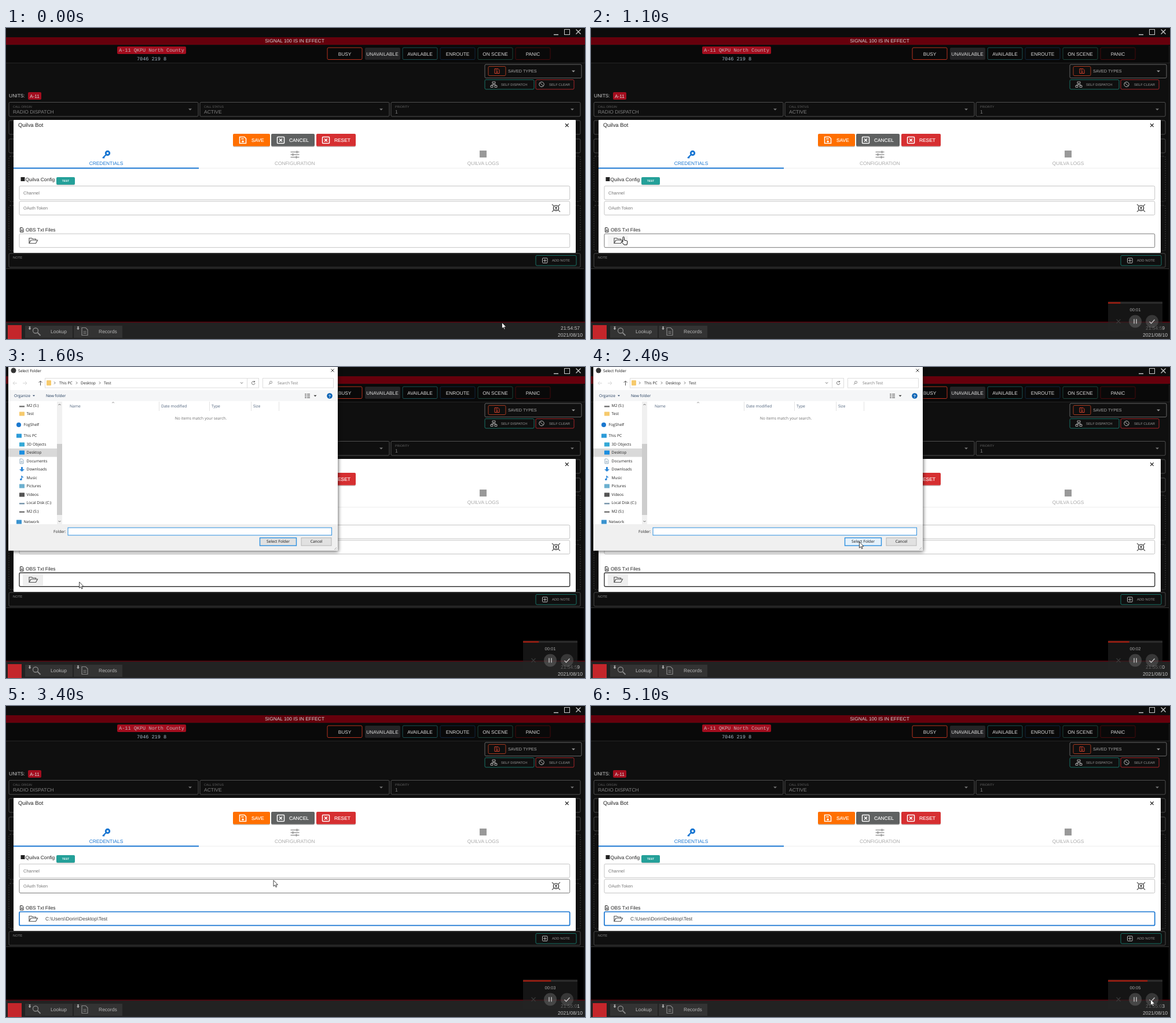
An HTML page for the animation above (5.2 s loop, 1000 by 538 pixels).

```html
<!DOCTYPE html>
<html lang="en">
<head>
<meta charset="utf-8">
<title>Dispatch console</title>
<style>
html, body { margin: 0; height: 100%; overflow: hidden; background: #000; }
svg { display: block; width: 100vw; height: 100vh; }
text { font-family: "Liberation Sans", Arial, sans-serif; text-rendering: geometricPrecision; white-space: pre; }
.mono { font-family: "Liberation Mono", monospace; }
.ui { font-family: "Open Sans", "Noto Sans", sans-serif; }
.raised { filter: drop-shadow(1px 2px 3px #0009); }
</style>
</head>
<body>
<script>
// Drawing helpers, all returning SVG markup
const fill = (x, y, w, h, color, r = 0, more = '') =>
  `<rect x="${x}" y="${y}" width="${w}" height="${h}" rx="${r}" fill="${color}" ${more}/>`;
const box = (x, y, w, h, color, r = 2, more = 'fill="none"') =>
  `<rect x="${x}" y="${y}" width="${w}" height="${h}" rx="${r}" stroke="${color}" ${more}/>`;
const text = (x, y, s, size, color, more = '') =>
  `<text x="${x}" y="${y}" font-size="${size}" fill="${color}" ${more}>${s}</text>`;
const mid = (x, y, s, size, color, more = '') => text(x, y, s, size, color, 'text-anchor="middle" ' + more);
const ui = (x, y, s, color = '#222', more = '') => text(x, y, s, 6.7, color, 'class="ui" ' + more);
const line = (d, color, w = 1, inside = 'none', more = '') =>
  `<path d="${d}" stroke="${color}" stroke-width="${w}" fill="${inside}" ${more}/>`;
const dot = (x, y, r, color, more = '') => `<circle cx="${x}" cy="${y}" r="${r}" fill="${color}" ${more}/>`;
const cross = (x, y, r, color, w = 1) =>
  line(`M${x - r} ${y - r}l${2 * r} ${2 * r}m0 ${-2 * r}l${-2 * r} ${2 * r}`, color, w);
const caret = (x, y, color, r = 3) => line(`M${x - r} ${y}h${2 * r}l${-r} ${r}z`, 'none', 0, color);
const chevron = (x, y, dy, color = '#555') => line(`M${x - 2} ${y - dy}l2 ${2 * dy}l2 ${-2 * dy}`, color, .9);
const floppy = (x, y, r, color, w = 1.2) =>
  line(`M${x - r} ${y - r}h${r * 1.5}l${r / 2} ${r / 2}v${r * 1.5}h${-2 * r}z` +
       `M${x - r / 2} ${y - r * .4}h${r * .8}`, color, w) + dot(x, y + r * .4, r * .32, color);
const sheet = (x, y, w, h, color, sw = 1) =>
  line(`M${x} ${y}h${w * .65}l${w * .35} ${w * .35}v${h - w * .35}h${-w}z` +
       `M${x + w * .25} ${y + h * .5}h${w * .5}M${x + w * .25} ${y + h * .72}h${w * .5}`, color, sw);

function windowFrame() {
  const states = [['BUSY', 555, '#b8321f'], ['UNAVAILABLE', 620, '#242426'], ['AVAILABLE', 685, '#1d5153'],
    ['ENROUTE', 750, '#11263d'], ['ON SCENE', 815, '#1d443b'], ['PANIC', 880, '#470b0d']];
  return fill(0, 0, 1000, 538, '#000') + fill(0, 0, 998, 417, '#0f0f0f') + fill(0, 0, 1000, 16, '#0c0c0c') +
    fill(0, 30, 1000, 30, '#090909') + fill(0, 60, 1000, 1, '#262626') +
    line('M946 11.5h8', '#ccc', 1.4) + box(964.5, 2.5, 9, 9, '#ccc', 0) + cross(988.5, 6.5, 4, '#ccc', 1.3) +
    fill(0, 16, 1000, 13, '#66000c') + mid(498.5, 25.2, 'SIGNAL 100 IS IN EFFECT', 8.4, '#d6d6d6') +
    fill(192, 32, 119, 13, '#a30d1e', 2) +
    text(195, 41, 'A-11 QKPU North County', 8.56, '#c8b4b8', 'class="mono"') +
    text(226, 55.5, '7046 219 8', 8.5, '#a9bccb', 'class="mono"') +
    states.map(([name, x, color], i) => (i === 1 ? fill(x, 34, 61, 21, color, 2) : box(x, 34, 60, 20.5, color)) +
      mid(x + 30, 47.6, name, 8.3, '#dcdcdc')).join('');
}

function callForm() {
  const selects = [[5, 327, 'CALL ORIGIN', 'RADIO DISPATCH'], [335, 327, 'CALL STATUS', 'ACTIVE'], [665, 327, 'PRIORITY', '1']];
  return box(827, 63, 167, 23.5, '#666') + box(833, 66.5, 30, 16, '#a63a20') + floppy(848, 74.5, 4, '#d0402c', 1) +
    text(867, 77.3, 'SAVED TYPES', 7.25, '#aaa') + caret(980, 73.5, '#999') +
    box(827, 89.5, 85, 16.5, '#1a7267') +
    line('M840 93h5v3h-5zM837 99.500h4v3h-4zM844 99.500h4v3h-4zM842.500 96v2M839 99.500v-1.500h7v1.500', '#bbb', .9) +
    text(855, 100.1, 'SELF DISPATCH', 5.9, '#999') +
    box(915, 89.5, 66, 16.5, '#a8272a') + dot(925, 97.5, 4.2, 'none', 'stroke="#bbb"') + line('M922 94.500l6 6', '#bbb') +
    text(938, 100.1, 'SELF CLEAR', 5.9, '#999') +
    text(5, 120, 'UNITS:', 8.5, '#ccc') + fill(38, 111, 23, 13, '#a30d1e', 2) + mid(49.5, 120.5, 'A-11', 8.3, '#ddd') +
    selects.map(([x, w, label, value]) => box(x, 128.5, w, 24.5, '#505050') + text(x + 7, 137.7, label, 5.2, '#666') +
      text(x + 7, 147.6, value, 8.47, '#828282') + caret(x + 313, 139.5, '#777')).join('') +
    box(5, 160, 987, 24, '#484848') + box(5, 192, 987, 24, '#484848') +
    [222, 307].map(y => box(5, y, 987, 78, '#444', 2, 'fill="none" stroke-dasharray="2 2"')).join('') +
    box(5, 390, 987, 24, '#484848') + text(12, 399, 'NOTE', 5.8, '#888') +
    box(915, 393.5, 70, 17.5, '#1a7267') + box(926.5, 398, 8.5, 8.5, '#bbb', 1) + line('M928 402.300h5.500m-2.700-2.700v5.400', '#bbb') +
    text(943, 404.4, 'ADD NOTE', 6, '#999') +
    fill(0, 416, 998, 1, '#333') + fill(998, 30, 1, 478, '#1c1c1c');
}

function modal() {
  const actions = [['SAVE', 392, 64, '#ff6f00', 424], ['CANCEL', 458, 75, '#5f6161', 489], ['RESET', 536, 68, '#d62f31', 567]];
  const black = '#222';
  return fill(13, 159, 971, 230, '#fff', 1) + text(21, 171.3, 'Quilva Bot', 9.4, black) + cross(968.8, 168.3, 2.8, black, 1.2) +
    actions.map(([name, x, w, color, tx], i) => fill(x, 184, w, 22, '#0003', 2) + fill(x, 183, w, 21.5, color, 2) +
      (i ? box(x + 10.5, 188.5, 12, 11, '#fff', 1, 'fill="none" stroke-width="1.5"') + cross(x + 16.5, 194, 2.5, '#fff', 1.7)
         : floppy(409, 194, 5.5, '#fff', 1.5)) +
      text(tx, 197, name, 8.35, '#fff', 'stroke="#fff" stroke-width=".15"')).join('') +
    fill(13, 242, 971, 1, '#eee') + fill(13, 241.5, 320, 2, '#1976d2') +
    dot(175.5, 216.5, 3.2, 'none', 'stroke="#1976d2" stroke-width="3"') + line('M173 219l-6 6M168 223l2 2', '#1976d2', 2.4) +
    mid(173, 236.6, 'CREDENTIALS', 8.4, '#1976d2') +
    line('M491.500 214.500h15M491.500 219h15M491.500 223.500h15', '#999', 1.4) +
    line('M502.500 212.500v4M495.500 217v4M501.500 221.500v4', '#999', 2) +
    mid(498.7, 236.6, 'CONFIGURATION', 8.4, '#aaa') +
    fill(818, 212, 12, 12, '#999') + mid(824, 236.6, 'QUILVA LOGS', 8.4, '#aaa') +
    fill(25.5, 258, 7, 7, black) + text(33.5, 265, 'Quilva Config', 8.45, black) +
    fill(87, 259, 32, 13, '#0003', 2) + fill(87, 258, 32, 13, '#24a099', 2) +
    mid(103, 266.3, 'TEST', 4.8, '#fff', 'font-weight="bold"') +
    box(23, 273.3, 950.7, 23.7, '#c4c4c4') + text(30, 287.6, 'Channel', 7.5, '#777') +
    box(23, 299.8, 950.7, 23.7, '#c4c4c4', 2, 'fill="none" id="token"') + text(30, 314, 'OAuth Token', 7.3, '#777') +
    line('M943 305l14 13m0-13l-14 13', '#555', 1.2) + dot(950, 311.5, 4.5, '#fff', 'stroke="#555" stroke-width="1.7"') +
    dot(950, 310.5, 1.5, '#444') + fill(949.2, 311, 1.6, 3.5, '#444') +
    sheet(24.5, 345.5, 5.5, 7.5, black) + text(34, 352, 'OBS Txt Files', 8.4, black) +
    fill(29, 358, 35, 20, '#eee', 1, 'id="press"') +
    box(23, 356, 950.7, 23.7, '#c4c4c4', 2, 'fill="none" id="folder"') +
    line('M40 372.500v-9h4.500l1.500 1.500h5.500v2M40 372.500l3-5.500h11.500l-3 5.500z', '#555', 1.2) +
    text(68, 370.6, 'C:\\Users\\Dorin\\Desktop\\Test', 8.5, '#444', 'id="path"');
}

function taskbar() {
  const pin = x => line(`M${x} 517h3m-1.500 0v5m-2-2h4`, '#ccc', 1.2);
  return fill(0, 508, 1000, 30, '#222') + fill(0, 508, 1000, 1.5, '#5a000b') + fill(3, 514, 24, 24, '#c4262b') +
    fill(33, 515, 82, 21, '#333') + fill(117, 515, 84, 21, '#333') + pin(39.5) + pin(123) +
    dot(51, 523.5, 4.5, 'none', 'stroke="#888" stroke-width="1.3"') + line('M54.500 527l5 5', '#888', 1.8) +
    sheet(131, 518.5, 10, 13, '#888', 1.2) +
    text(77, 528.3, 'Lookup', 8.5, '#b8b8b8') + text(160, 528.3, 'Records', 8.5, '#b8b8b8') +
    text(958, 522, '', 8.5, '#c4c4c4', 'id="clock"') + text(953, 534.3, '2021/08/10', 8.6, '#c4c4c4');
}

function recorder() {
  return `<g id="rec">${fill(893, 473, 94, 52, '#242424', 1, 'opacity=".6"')}${fill(893, 474, 94, 3, '#2b2b2b')}` +
    fill(893, 474, 0, 3, '#8e1d12', 0, 'id="bar"') + mid(940, 490, '', 7.5, '#aaa', 'id="count"') +
    cross(911, 507.5, 3.5, '#3a3a3a', 1.2) +
    dot(940, 507.5, 11, '#777', 'opacity=".42"') + line('M938 503.500v8M942 503.500v8', '#c4c4c4', 1.4) +
    dot(969, 507.5, 11, '#777', 'opacity=".35"') + line('M964.500 508l3 3l6-6.500', '#c4c4c4', 1.4) + '</g>';
}

function folderDialog() {
  const rows = [['M2 (S:)', 67, '#777'], ['Test', 81, '#f6ca6d'], ['FogShelf', 100, '#1a78cf'], ['This PC', 119, '#2d9bd8'],
    ['3D Objects', 134, '#35a9d6'], ['Desktop', 148, '#1c8ee0'], ['Documents', 163, '#8fa9bd'], ['Downloads', 177, '#2a86d8'],
    ['Music', 192, '#2a86d8'], ['Pictures', 206, '#6cb0cf'], ['Videos', 221, '#555'], ['Local Disk (C:)', 235, '#7b98ad'],
    ['M2 (S:)', 249.5, '#777'], ['Network', 268, '#3a93cf']];
  const roots = ['FogShelf', 'This PC', 'Network'];
  const icon = (name, x, y, color) => {
    if (name === 'FogShelf') return dot(x + 4, y, 4, color);
    if (name === 'Music') return line(`M${x + 4} ${y + 2}v-6q0 2 3 3`, color, 1.3) + dot(x + 2.8, y + 2.5, 1.8, color);
    if (name === 'Downloads') return line(`M${x + 3} ${y - 4}h3v4h3l-4.500 4l-4.500-4h3z`, 'none', 0, color);
    if (/:\)/.test(name)) return fill(x, y, 9, 2.5, color);
    if (name === 'Documents') return sheet(x + 1, y - 4, 6, 8, color);
    return fill(x, y - 3.5, 9, 7, color, .5);
  };
  const columns = [['Name', 110, 264], ['Date modified', 268, 351], ['Type', 355, 423], ['Size', 427, 471]];
  return fill(4, -1, 569, 318.5, '#fff', 0, 'class="raised"') +
    dot(13, 6, 4.5, '#333') + ui(21, 8.6, 'Select Folder', '#111') + cross(564, 6, 2.6, '#222', .9) +
    line('M19 28h-7m3-3l-3 3l3 3M29 28h7m-3-3l3 3l-3 3', '#d0d0d0', .9) + line('M59.500 32v-8m-3 3l3-3l3 3', '#555') +
    box(67.5, 19.5, 349, 16.5, '#ddd', 0) + box(416.5, 19.5, 20, 16.5, '#ddd', 0) + box(443.5, 19.5, 122, 16.5, '#ddd', 0) +
    fill(70, 23, 8, 9, '#f6ca6d', 1) +
    [84, 122, 162].map(x => line(`M${x - 1} 25.500l2 2l-2 2`, '#555', .9)).join('') +
    ui(92, 30, 'This PC') + ui(129, 30, 'Desktop') + ui(169, 30, 'Test') + chevron(407, 27.5, 1) +
    line('M429 25.500a2.800 2.800 0 1 0 1 2.500M429.500 24v2h-2', '#555', .9) +
    dot(457.5, 26.5, 2, 'none', 'stroke="#777" stroke-width=".8"') + line('M456 28l-2 2.500', '#777', .9) +
    ui(469, 30, 'Search Test', '#777') +
    fill(4, 40, 569, 19, '#f5f6f7') + ui(14, 52.2, 'Organize', '#1e395b') + caret(48, 48.7, '#1e395b', 2) +
    ui(69, 52.2, 'New folder', '#1e395b') +
    line('M516 47h3m1 0h5M516 50h3m1 0h5M516 53h3m1 0h5', '#777', 1.3) + caret(534, 48.7, '#333', 2.5) +
    dot(559, 50, 4.8, '#0a63b5') + mid(559, 52.7, '?', 7, '#fff', 'font-weight="bold"') +
    fill(4, 141, 84, 14.5, '#d9d9d9') +
    rows.map(([name, y, color]) => {
      const x = roots.includes(name) ? 18 : 23;
      return icon(name, x, y, color) + ui(x + 12.5, y + 2.4, name);
    }).join('') +
    fill(88, 60, 9, 212, '#f0f0f0') + fill(88, 133, 9, 123, '#cdcdcd') + chevron(92.5, 65, -1) + chevron(92.5, 267, 1) +
    columns.map(([name, x, end]) => ui(x, 69.8, name, '#4c607a') + fill(end, 60, 1, 16, '#e3e3e3')).join('') +
    chevron(185, 61.5, -.8, '#888') + ui(336.5, 91, 'No items match your search.', '#6d6d6d', 'text-anchor="middle"') +
    fill(4, 272, 569, 45.5, '#f0f0f0') + ui(82, 287, 'Folder:') + box(107, 278, 455.5, 13, '#2b8fe0', 0, 'fill="#fff"') +
    box(438.5, 295.5, 63, 13.5, '#2b8fe0', 0, 'id="choose" stroke-width="1.4"') +
    ui(470, 304.4, 'Select Folder', '#111', 'text-anchor="middle"') +
    box(510, 295.5, 52, 13.5, '#b5b5b5', 0, 'fill="#e1e1e1"') + ui(536, 304.4, 'Cancel', '#111', 'text-anchor="middle"') +
    line('M567 316l4-4m-1.500 4l1.500-1.500', '#aaa', .9);
}

// The dialog's see-through shell, before its contents are drawn
function dialogShell() {
  return fill(8, 0, 560, 315, '#f0f0f0', 0, 'class="raised" opacity=".67"') +
    dot(17, 8.5, 4.3, '#444') + ui(25, 11, 'Select Folder', '#222') + cross(559, 8.5, 2.5, '#333', .9) +
    fill(91, 62, 9, 208, '#888', 0, 'opacity=".3"') + fill(91, 133, 9, 123, '#888', 0, 'opacity=".7"') +
    chevron(95.5, 66, -1, '#222') + chevron(95.5, 265, 1, '#222') +
    fill(85, 277, 23, 10, '#fff') + box(109, 275.5, 449, 13, '#7fb9e8', 0, 'fill="#fff"') +
    fill(435, 292, 64, 15, '#fff') + fill(505, 292, 53, 15, '#fff');
}

const arrow = line('M0 0v10.500l2.400-2.200 1.700 3.600 1.600-.7-1.600-3.500h3.300z', '#111', .8, '#fff', 'id="arrow"');
const hand = line('M2 1.500a1.200 1.200 0 0 1 2.400 0V6l4.500 1q1.200.4 1 2L9 14H4L.5 9.500q-.6-1.300.8-1.300L2 9z', '#111', 1, '#fff', 'id="hand"');

document.body.innerHTML = `<svg viewBox="0 0 1000 538">${windowFrame()}${callForm()}${modal()}${taskbar()}${recorder()}
  <g id="shell">${dialogShell()}</g><g id="dialog">${folderDialog()}</g><g id="cursor">${arrow}${hand}</g></svg>`;

const el = id => document.getElementById(id);
const show = (id, on) => el(id).setAttribute('visibility', on ? 'visible' : 'hidden');
const set = (id, attrs) => { for (const k in attrs) el(id).setAttribute(k, attrs[k]); };

const track = [[0, 856.5, 509.5], [100, 856.5, 509.5], [600, 53, 361], [1100, 53, 361], [1400, 111.5, 375], [1500, 111.5, 375],
  [2300, 463.5, 302.5], [3100, 462, 301.5], [3800, 462, 301.5], [4100, 712.5, 411], [5000, 966.5, 507.5], [5200, 966.5, 507.5]];
const ticks = [100, 700, 1800, 2800, 3800, 4900];
const counts = [600, 1700, 2700, 3700, 4700];
const passed = (times, t) => times.filter(v => t >= v).length;
const between = (t, a, b) => t >= a && t < b;

function cursorAt(t) {
  const i = track.findIndex(k => k[0] > t);
  const [t0, x0, y0] = track[i - 1], [t1, x1, y1] = track[i];
  const p = (t - t0) / (t1 - t0), e = p * p * (3 - 2 * p);
  return `translate(${x0 + (x1 - x0) * e} ${y0 + (y1 - y0) * e})`;
}

function draw(now) {
  const t = Math.floor(now % 5200 / 100) * 100;
  const second = 57 + passed(ticks, t);
  el('clock').textContent = `21:${second < 60 ? 54 : 55}:${String(second % 60).padStart(2, '0')}`;
  el('count').textContent = `00:0${passed(counts, t)}`;
  show('rec', t >= 100);
  set('bar', { width: 8.5 + 11.7 * t / 1000 });

  const chosen = t >= 3300, closing = t === 3100;
  show('path', chosen);
  show('press', between(t, 600, 3300));
  set('press', { fill: t < 1200 ? '#f5f5f5' : '#eee' });
  const edge = chosen ? '#1976d2' : t >= 1200 ? '#333' : t >= 600 ? '#777' : '#c4c4c4';
  set('folder', { stroke: edge, 'stroke-width': chosen ? 1.7 : t >= 1200 ? 1.4 : 1 });
  set('token', { stroke: between(t, 3200, 4200) ? '#777' : '#c4c4c4' });

  show('shell', t === 1400);
  show('dialog', between(t, 1500, 3200));
  set('dialog', { opacity: closing ? .2 : 1, transform: `translate(288 158) scale(${closing ? .964 : 1}) translate(-288 -158)` });
  set('choose', { fill: t >= 2300 ? '#e5f1fb' : '#e1e1e1' });

  const pointing = between(t, 600, 1200);
  show('hand', pointing);
  show('arrow', !pointing);
  set('cursor', { transform: cursorAt(t) });
  requestAnimationFrame(draw);
}
requestAnimationFrame(draw);
</script>
</body>
</html>
```
